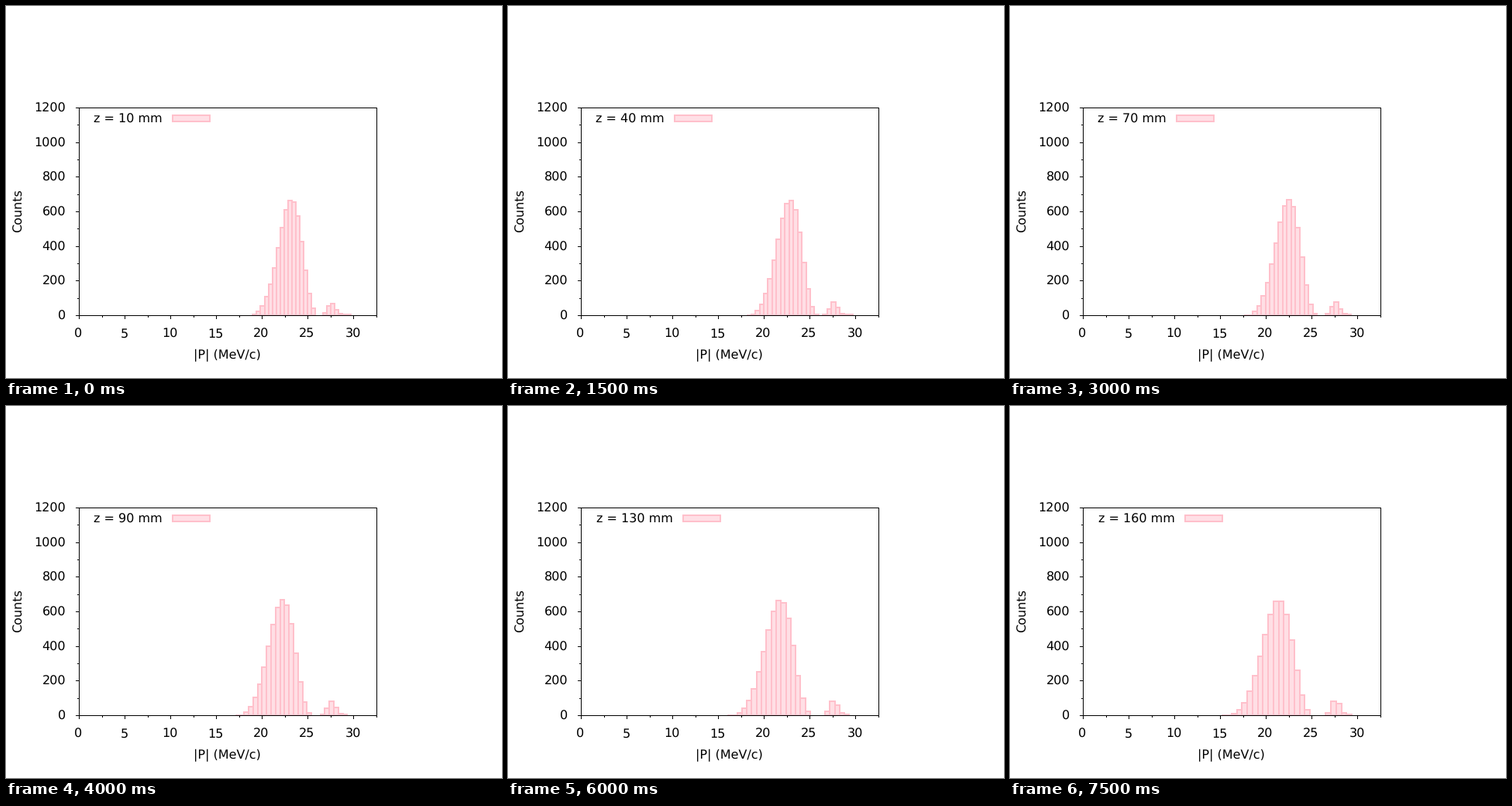
Recreate the animation shown at these times as a matplotlib script. Size 640 by 480 pixels, loop 8 s.

```python
import matplotlib.pyplot as plt
import numpy as np
from matplotlib.animation import FuncAnimation
from matplotlib.patches import Rectangle

W, H, DPI = 640, 480, 100
PX = 72 / DPI
LEFT, RIGHT, TOP, BOTTOM = 94.5, 478.5, 131.5, 399.5
XMAX, YMAX, BINS = 32.5, 1200, 25
EDGE, FILL = "#ffc0cb", "#ffdfe5"


def lobe(d, left, right, left_power=2, right_power=2):
    """Bell curve of height 1 with a different slope on each side."""
    return np.where(d < 0,
                    np.exp(-(np.abs(d) / left) ** left_power),
                    np.exp(-(np.abs(d) / right) ** right_power))


def histogram(z):
    """Bin edges in pixels and counts at depth z; the bins span all values."""
    start = np.interp(z, [10, 40, 70, 130, 160], [318.4, 308.2, 302, 283, 272.5])
    end = 444.5 if z < 70 else 440.4 if z < 140 else 441
    edges = np.linspace(start, end, BINS + 1)
    mid = (edges[1:] + edges[:-1]) / 2

    # The main peak keeps its shape per bin and drifts slowly to later bins.
    center = np.interp(z, [10, 40, 160], [9.2, 9.64, 10.4])
    spread = np.interp(z, [10, 40, 160], [1.06, 1.01, 1])
    d = (np.arange(BINS) - center) / spread
    main = np.maximum(685 * lobe(d, 4.34, 3.75, 1.8, 2.4) - 18, 2 * (d < 0))

    # The small peak stays at a fixed place along x.
    d = mid - 420
    small = 13.6 * (edges[1] - edges[0]) * lobe(d, 6.65, 7.8)
    return edges, main + np.maximum(small, 5 * (d > 0))


plt.rcParams.update({
    "font.family": "DejaVu Sans",
    "font.size": 16 * PX,
    "text.hinting": "none",
})
fig = plt.figure(figsize=(W / DPI, H / DPI), dpi=DPI, facecolor="white")
ax = fig.add_axes([0, 0, 1, 1])
ax.set(xlim=(0, W), ylim=(H, 0))
ax.axis("off")


def line(xs, ys):
    ax.plot(xs, ys, color="black", lw=PX, solid_capstyle="butt", snap=False, zorder=3)


def label(x, y, text, **kw):
    return ax.text(x, y, text, ha="left", va="baseline", rotation_mode="anchor", **kw)


def box(x, y, w, h):
    return ax.add_patch(Rectangle((x, y), w, h, fc=FILL, ec=EDGE, lw=2 * PX,
                                  joinstyle="miter", zorder=2))


def draw_axes():
    ax.add_patch(Rectangle((LEFT, TOP), RIGHT - LEFT, BOTTOM - TOP, fill=False,
                           ec="black", lw=PX, joinstyle="miter", snap=False, zorder=3))
    digit = 0.636 * 16
    for i in range(14):
        x = np.floor(LEFT + i * 2.5 / XMAX * (RIGHT - LEFT)) + 0.5
        line([x, x], [BOTTOM, BOTTOM + (2.5 if i % 2 else 4.5)])
        if i % 2 == 0:
            text = str(i * 5 // 2)
            label(x - 1 - len(text) * digit / 2, 428, text)
    for i in range(13):
        y = np.floor(BOTTOM - i * 100 / YMAX * (BOTTOM - TOP)) + 0.5
        line([LEFT, LEFT - (2.5 if i % 2 else 4.5)], [y, y])
        if i % 2 == 0:
            text = str(i * 100)
            label(77 - len(text) * digit, y + 5.6, text)
    label(242, 455, "|P| (MeV/c)")
    label(21, 292.5, "Counts", rotation=90)


draw_axes()
bars = [box(0, 0, 1, 1) for _ in range(BINS)]
key_box = box(215, 141, 48, 8)
key_text = label(113, 151, "")


def update(i):
    z = 10 * (i + 1)
    edges, counts = histogram(z)
    base = BOTTOM - 0.5
    for bar, x0, x1, n in zip(bars, edges, edges[1:], counts):
        h = n / YMAX * (BOTTOM - TOP)
        bar.set_bounds(x0, base - h, x1 - x0, h)
        bar.set_visible(n > 1.5)
    wide = z >= 100
    key_box.set_x(226 if wide else 215)
    key_text.set_x(114 if wide else 113)
    key_text.set_text(f"z = {z} mm")
    return [*bars, key_box, key_text]


anim = FuncAnimation(fig, update, frames=16, interval=500, repeat=True,
                     repeat_delay=0, blit=False)
plt.show()
```
